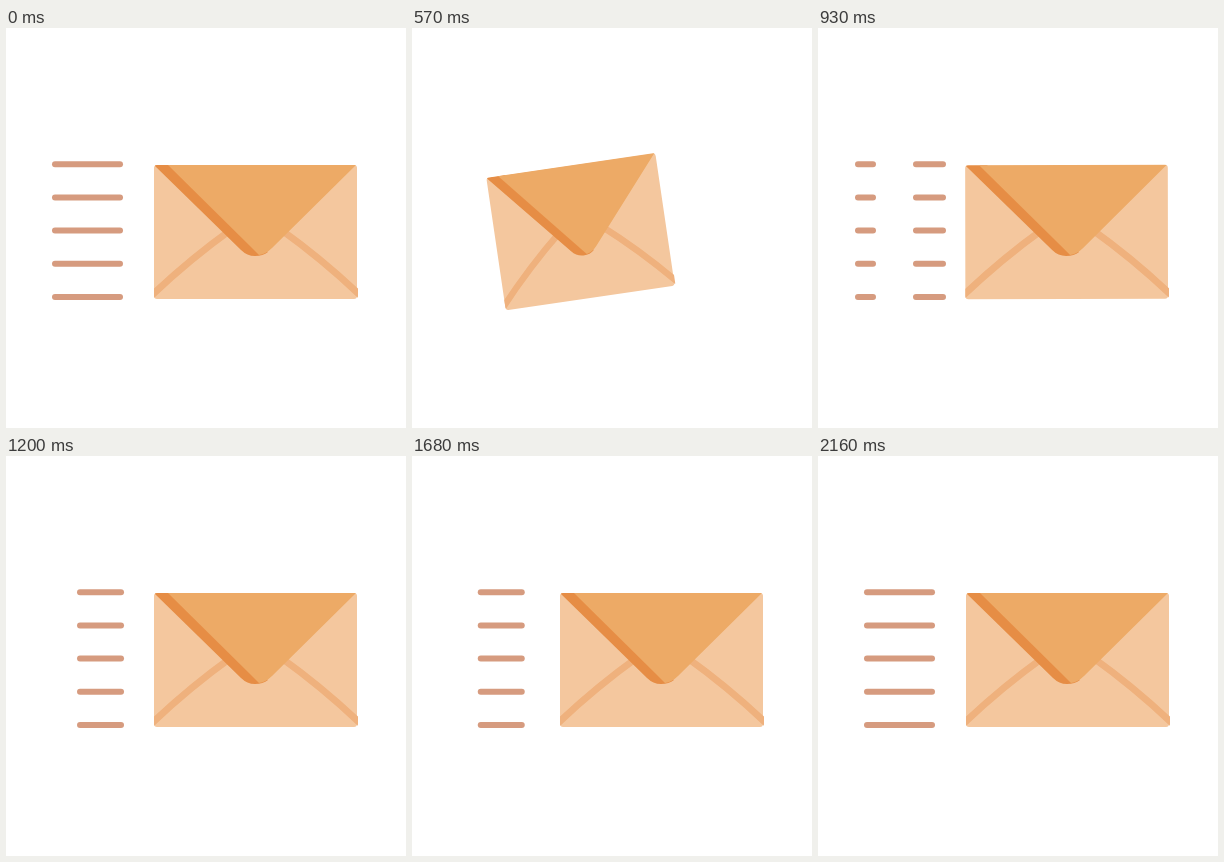
Animation of 400 by 400 pixels, one loop 3.19 s. Source, as an HTML page:

```html
<!DOCTYPE html>
<html lang="en">
<head>
<meta charset="utf-8">
<title>Sending envelope</title>
<style>
  html, body { margin: 0; width: 100%; height: 100%; overflow: hidden; background: #fff; }
  svg { display: block; width: 100%; height: 100%; }
  #streaks { stroke: #d69b7f; stroke-width: 6; stroke-linecap: round; }
</style>
</head>
<body>
<svg viewBox="0 0 400 400">
  <defs>
    <clipPath id="body"><rect x="148" y="137" width="204" height="134" rx="3"/></clipPath>
  </defs>
  <g id="streaks"></g>
  <g id="envelope">
    <rect x="148" y="137" width="203" height="134" rx="3" fill="#f4c79e"/>
    <g clip-path="url(#body)">
      <path d="M145 268Q184 231 226 201M355 268Q316 231 274 201" fill="none" stroke="#efb17d" stroke-width="7"/>
      <path d="M149 137H170L262 224Q257 228 249 228Q241 228 235 222L149 138Z" fill="#e68d45"/>
      <path d="M162 137H350L266 220Q260 226 253 227L246 220Z" fill="#edaa66"/>
    </g>
  </g>
</svg>
<script>
  const LOOP = 3190, STEP = 30;
  const ARRIVE = 240, DEPART = 435, HOME = 960;
  const STREAK_ON = 780, REST = 2160;
  const DASH = 41, GAP = 43, DASH_SPEED = 21.33 / STEP;

  const envelope = document.getElementById('envelope');
  const streaks = document.getElementById('streaks');
  const lines = Array.from({ length: 5 }, (_, i) => {
    const line = document.createElementNS('http://www.w3.org/2000/svg', 'line');
    const y = 136.2 + i * 33.2;
    line.setAttribute('y1', y);
    line.setAttribute('y2', y);
    return streaks.appendChild(line);
  });

  const ease = (t, from, to) => {
    const f = Math.min(1, Math.max(0, (t - from) / (to - from)));
    return f * f * (3 - 2 * f);
  };

  function drawEnvelope(t) {
    const pull = ease(t, 0, ARRIVE) - ease(t, DEPART, HOME);
    envelope.setAttribute('transform',
      `translate(${250 - 97 * pull} ${204 - 0.5 * pull}) rotate(${-10 * pull}) ` +
      `scale(${1 - 0.19 * pull} 1) translate(-250 -204)`);
  }

  function drawStreaks(t) {
    const resting = t < STEP || t >= REST;
    streaks.style.display = resting || t >= STREAK_ON ? '' : 'none';
    streaks.style.strokeDasharray = resting ? 'none' : `${DASH} ${GAP}`;
    // Increasing offset carries the dashes to the left.
    const shift = (t - 930) * DASH_SPEED - 58;
    streaks.style.strokeDashoffset = resting ? 0 : shift;
    for (const line of lines) {
      line.setAttribute('x1', resting ? 49 : 40);
      line.setAttribute('x2', resting ? 114 : 125);
    }
  }

  const start = performance.now();
  function frame() {
    const time = (performance.now() - start) % LOOP;
    const t = Math.floor(time / STEP) * STEP;
    drawEnvelope(t);
    drawStreaks(t);
    requestAnimationFrame(frame);
  }
  frame();
</script>
</body>
</html>
```
